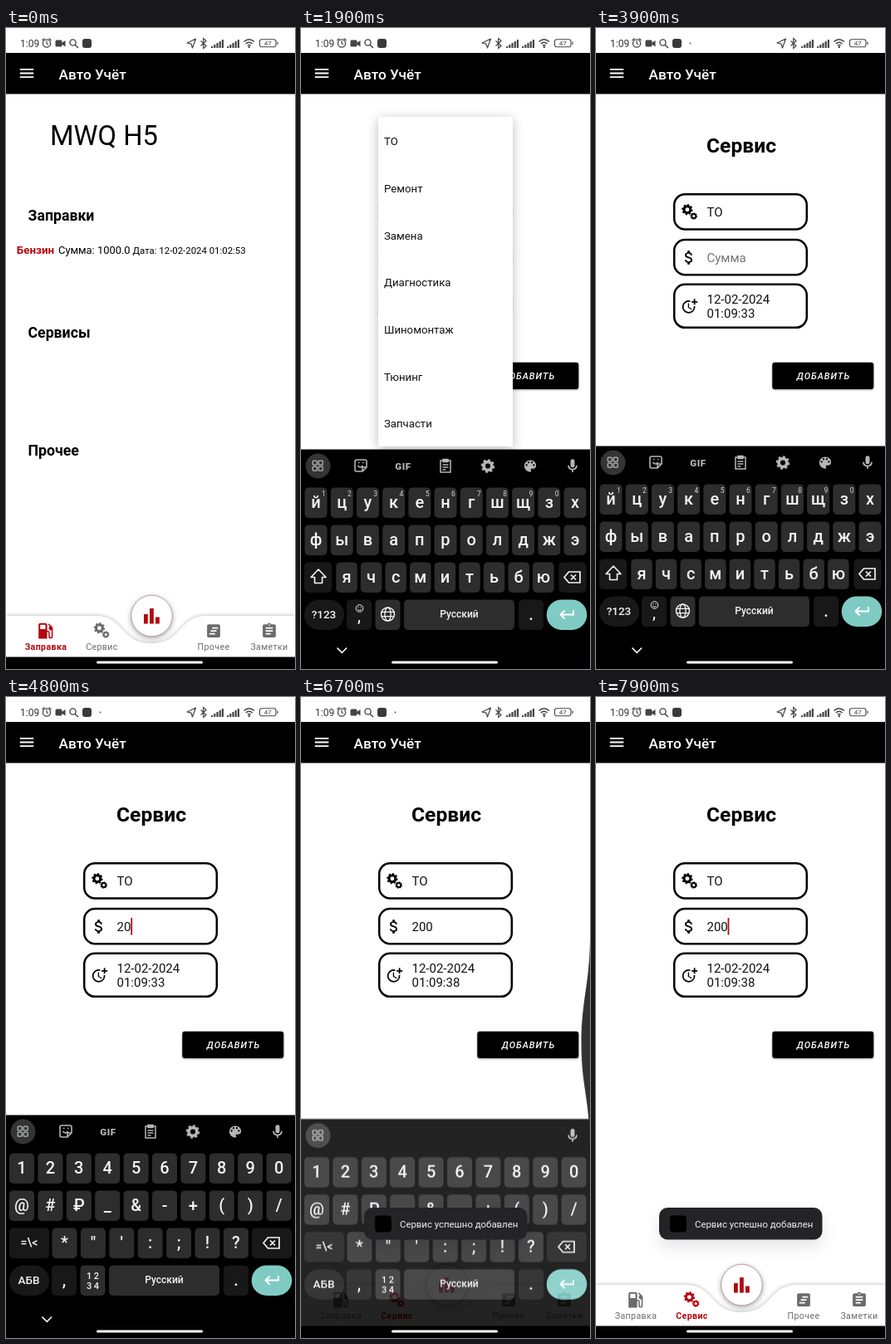
Animation of 348 by 772 pixels, one loop 8 s. Source, as an HTML page:

```html
<!DOCTYPE html>
<html lang="ru">
<head>
<meta charset="utf-8">
<title>Авто Учёт</title>
<style>
html, body { margin: 0; width: 100%; height: 100%; overflow: hidden; background: #fff; }
svg { display: block; width: 348px; height: 772px; font-family: Roboto, "Noto Sans", sans-serif; }
text { white-space: pre; }
.mid { text-anchor: middle; }
.line { fill: none; stroke: currentColor; }
.home, .form, .menu, .kb, .toast, .edge, .gas, .service { animation: 8s linear infinite; }
.home { animation-name: home; }
.form { animation-name: form; }
.menu { animation-name: menu; filter: drop-shadow(0 3px 7px rgba(0,0,0,.26)); }
.kb { animation-name: kb; }
.toast { animation-name: toast; filter: drop-shadow(0 9px 9px rgba(0,0,0,.1)); }
.edge { animation-name: edge; transform-origin: 348px 0; }
.tab { color: #6b6b6b; font-size: 10.6px; letter-spacing: .4px; }
.gas { animation-name: gas; animation-timing-function: step-end; }
.service { animation-name: service; animation-timing-function: step-end; }
.bar { filter: drop-shadow(0 -1px 2px rgba(0,0,0,.22)); }
.fab { filter: drop-shadow(0 2px 3px rgba(0,0,0,.35)); }
.add { filter: drop-shadow(0 1px 1px rgba(0,0,0,.4)); }
@keyframes home { 0%, 8.125% { opacity: 1 } 12.5%, 100% { opacity: 0 } }
@keyframes form { 0%, 8.125% { opacity: 0 } 12.5%, 100% { opacity: 1 } }
@keyframes menu { 0%, 20% { opacity: 0 } 22.5%, 31.25% { opacity: 1 } 33.75%, 100% { opacity: 0 } }
@keyframes toast { 0%, 77.5% { opacity: 0 } 81.25%, 100% { opacity: 1 } }
@keyframes edge { 0%, 80% { transform: scaleX(0) } 83.75% { transform: scaleX(1) } 87.5%, 100% { transform: scaleX(0) } }
@keyframes gas { 0% { color: #b4060f; font-weight: 700 } 8.75%, 100% { color: #6b6b6b; font-weight: 400 } }
@keyframes service { 0% { color: #6b6b6b; font-weight: 400 } 8.75%, 100% { color: #b4060f; font-weight: 700 } }
@keyframes kb {
  0%, 20% { transform: translateY(268px); opacity: 1 }
  21.25% { transform: translateY(140px) }
  22.5% { transform: translateY(40px) }
  23.75% { transform: translateY(4px) }
  25%, 82.5% { transform: none; opacity: 1 }
  83.75% { transform: translateY(4px); opacity: .87 }
  85% { transform: translateY(70px); opacity: .4 }
  86.25% { transform: translateY(180px); opacity: .08 }
  87.5%, 100% { transform: translateY(268px); opacity: 0 }
}
</style>
</head>
<body>
<svg id="stage" viewBox="0 0 348 772"></svg>
<script>
const LOOP = 8000;
const RED = '#b4060f';

// 24-unit icons
const icons = {
  menu: 'M3 18h18v-2H3zM3 13h18v-2H3zM3 6v2h18V6z',
  gas: 'M19.8 7.2l-3.7-3.7L15 4.6l2.1 2.1A2.5 2.5 0 0 0 19 11.3v7.2a1 1 0 0 1-2 0V14a2 2 0 0 0-2-2h-1V5a2 2 0 0 0-2-2H6a2 2 0 0 0-2 2v16h10v-7.5h1.5v5a2.5 2.5 0 0 0 5 0V9q0-1-.7-1.8zM12 10H6V5h6z',
  board: 'M19 3h-4.2a3 3 0 0 0-5.6 0H5a2 2 0 0 0-2 2v14a2 2 0 0 0 2 2h14a2 2 0 0 0 2-2V5a2 2 0 0 0-2-2zM12 3a1 1 0 1 1 0 2a1 1 0 1 1 0-2zM14 17H7v-2h7zM17 13H7v-2h10zM17 9H7V7h10z',
  note: 'M5 3h14a2 2 0 0 1 2 2v14a2 2 0 0 1-2 2H5a2 2 0 0 1-2-2V5a2 2 0 0 1 2-2zM10 7v2h8V7zM8 11v2h8v-2zM6 15v2h8v-2z',
  clock: 'M10 8v6l4.7 2.9.8-1.2-4-2.4V8zM17.9 12A7 7 0 1 1 13 6.3V4.2A9 9 0 1 0 19.9 12zM20 5V2h-2v3h-3v2h3v3h2V7h3V5z',
  money: 'M11.8 10.9c-2.27-.59-3-1.2-3-2.15 0-1.09 1.01-1.85 2.7-1.85 1.78 0 2.44.85 2.5 2.1h2.21c-.07-1.72-1.12-3.3-3.21-3.81V3h-3v2.16c-1.94.42-3.5 1.68-3.5 3.61 0 2.31 1.91 3.46 4.7 4.13 2.5.6 3 1.48 3 2.41 0 .69-.49 1.79-2.7 1.79-2.06 0-2.87-.92-2.98-2.1h-2.2c.12 2.19 1.76 3.42 3.68 3.83V21h3v-2.15c1.95-.37 3.5-1.5 3.5-3.55 0-2.84-2.43-3.81-4.7-4.4z',
  mic: 'M12 14a3 3 0 0 0 3-3V5a3 3 0 0 0-6 0v6a3 3 0 0 0 3 3zM17 11a5 5 0 0 1-10 0H5a7 7 0 0 0 6 6.9V21h2v-3.1A7 7 0 0 0 19 11z',
  palette: 'M12 3a9 9 0 0 0 0 18a1.5 1.5 0 0 0 1.1-2.5a1.5 1.5 0 0 1 1.1-2.5H16a5 5 0 0 0 5-5c0-4.4-4-8-9-8z' +
    [[6.5, 10.5], [9.5, 6.5], [14.5, 6.5], [17.5, 10.5]].map(([x, y]) => `M${x} ${y - 1.5}a1.5 1.5 0 1 1 0 3a1.5 1.5 0 1 1 0-3z`).join('')
};

const icon = (name, x, y, size) =>
  `<path fill="currentColor" fill-rule="evenodd" d="${icons[name]}" transform="translate(${x - size / 2} ${y - size / 2}) scale(${size / 24})"/>`;
const text = (s, x, y, size, more = '') => `<text x="${x}" y="${y}" font-size="${size}" ${more}>${s}</text>`;
const mid = (s, x, y, size, more = '') => text(s, x, y, size, 'class="mid" ' + more);
const rect = (x, y, w, h, r, fill, more = '') =>
  `<rect x="${x}" y="${y}" width="${w}" height="${h}" rx="${r}" fill="${fill}" ${more}/>`;
const line = (d, w, more = '') => `<path class="line" d="${d}" stroke-width="${w}" ${more}/>`;
const show = (spans, body) => `<g data-show="${spans}">${body}</g>`;
const tint = (color, body) => `<g color="${color}">${body}</g>`;

const gear = (x, y, r, teeth = 8) =>
  `<circle class="line" cx="${x}" cy="${y}" r="${r * .6}" stroke-width="${r * .45}"/>
   <circle class="line" cx="${x}" cy="${y}" r="${r * .86}" stroke-width="${r * .3}" pathLength="${teeth * 2}" stroke-dasharray="1"/>`;
const cogs = (x, y) => gear(x - 2.6, y - 2.8, 6.6) + gear(x + 5.2, y + 5, 4.3);
const cursor = (x, y, spans) => show(spans, rect(x, y, 1.8, 20.5, 0, '#a3101b'));

function statusBar() {
  const bars = x => [0, 1, 2, 3, 4].map(i => rect(x + i * 3.2, 22 - i * 2, 2.2, 2 + i * 2, .5, '#444')).join('');
  return rect(0, 0, 348, 30, 0, '#fff') + text('1:09', 17, 23, 12, 'fill="#333"') + tint('#444',
    `<circle class="line" cx="49" cy="18.5" r="4.6" stroke-width="1.3"/>` +
    line('M49 15.5v3.2l2 1M43.5 15l3-2.5M54.5 15l-3-2.5', 1.2) +
    rect(59.5, 14.5, 8, 8, 1.5, '#444') + `<path d="M67 18l4.5-3v7.5l-4.5-3z" fill="#444"/>` +
    `<circle class="line" cx="80.5" cy="17.5" r="3.6" stroke-width="1.4"/>` + line('M83 20.2l4 3.8', 1.5) +
    rect(92, 13, 11, 11, 3, '#3a3a3a') +
    line('M228.5 13l-10.5 5 5 1.2 1.5 4.8z', 1.2, 'stroke-linejoin="round"') +
    line('M234.5 15.5l6.5 6-3.3 3v-12l3.3 3-6.5 6', 1.2) + bars(247) + bars(266) +
    line('M286.5 16.5q6-5.5 12.5 0M288.8 19q3.9-3.5 7.9 0M291 21.2q1.8-1.5 3.6 0', 1.5) +
    `<circle cx="292.8" cy="23" r="1.2" fill="#444"/>` +
    line('M308 13.7h14.5a2.5 2.5 0 0 1 2.5 2.5v4.1a2.5 2.5 0 0 1-2.5 2.5h-14.5a2.5 2.5 0 0 1-2.5-2.5v-4.1a2.5 2.5 0 0 1 2.5-2.5zM327 16.5v3.5', 1.1) +
    mid(47, 315.3, 21.2, 8, 'fill="#444"')) +
    show('2100-6900', '<circle cx="113.5" cy="18.5" r=".9" fill="#555"/>');
}

function header() {
  return rect(0, 30, 348, 49.5, 0, '#000') + tint('#fff', icon('menu', 25, 54.5, 22)) +
    text('Авто Учёт', 63.5, 61.5, 17.2, 'fill="#fff" font-weight="500"');
}

function home() {
  const heads = ['Заправки', 'Сервисы', 'Прочее'];
  return `<g class="home">` + text('MWQ H5', 53, 140.5, 32.7) +
    heads.map((s, i) => text(s, 26.5, 231.5 + i * 141.5, 17.7, 'font-weight="700"')).join('') +
    text('Бензин', 12.8, 271.5, 13.4, `font-weight="700" fill="${RED}"`) +
    text('Сумма: 1000.0', 63, 271.5, 12.9) + text('Дата: 12-02-2024 01:02:53', 152.5, 271.5, 11.4) + '</g>';
}

function form() {
  const box = (y, h) => rect(94.2, y, 159.6, h, 13, '#fff', 'stroke="#000" stroke-width="2.5"');
  const value = (s, y, fill = '#111') => text(s, 133.5, y, 15, `fill="${fill}"`);
  const hint = (s, y) => value(s, y, '#757575');
  return `<g class="form">` + mid('Сервис', 175, 149.8, 24.6, 'font-weight="700"') +
    box(200.2, 42.2) + box(255, 42.2) + box(308.8, 52) +
    cogs(112.5, 221.5) + icon('money', 112, 276.5, 22) + icon('clock', 112.5, 335, 21) +
    show('0-2500', hint('Вид сервиса', 227.2)) + show('2500-8000', value('ТО', 227.2)) +
    show('0-4500', hint('Сумма', 282)) + show('4500-4700', value('2', 282)) +
    show('4700-5000', value('20', 282)) + show('5000-8000', value('200', 282)) +
    value('12-02-2024', 332) + show('0-5900', value('01:09:33', 349.3)) + show('5900-8000', value('01:09:38', 349.3)) +
    cursor(133.5, 211, '1300-1800 2300-2500') + cursor(153, 211, '2500-3000') +
    cursor(133.5, 266, '3100-3600 4100-4500') + cursor(142, 266, '4500-4700') + cursor(150.3, 266, '4700-5000') +
    cursor(158.6, 266, '5000-5500 6000-6500 7000-7500 7900-8000') +
    rect(212.3, 402.7, 122, 32.4, 3, '#000', 'class="add"') +
    mid('ДОБАВИТЬ', 274, 423, 11, 'fill="#fff" font-weight="500" font-style="italic" letter-spacing="1"') + '</g>';
}

function bottomNav() {
  const tab = (name, x, pic, cls = '') => `<g class="tab ${cls}">${pic}${mid(name, x, 748.5, 'inherit', 'fill="currentColor"')}</g>`;
  return `<path class="bar" fill="#fff" d="M0 708H108C143 708 137 741 175 741S207 708 242 708H348V757H0z"/>` +
    tab('Заправка', 48, icon('gas', 47.5, 726, 25), 'gas') + tab('Сервис', 115.5, cogs(115, 725.5), 'service') +
    tab('Прочее', 250, icon('note', 250, 726, 21)) + tab('Заметки', 317, icon('board', 317, 726, 21)) +
    `<circle class="fab" cx="175.5" cy="708" r="24.8" fill="#fff" stroke="#a87878" stroke-width=".7"/>` +
    rect(166, 706, 4.8, 11.5, 0, RED) + rect(173, 699, 4.8, 18.5, 0, RED) + rect(180, 709.5, 4.8, 8, 0, RED) +
    rect(0, 757.5, 348, 15, 0, '#000');
}

function menu() {
  const items = ['ТО', 'Ремонт', 'Замена', 'Диагностика', 'Шиномонтаж', 'Тюнинг', 'Запчасти'];
  return `<g class="menu">` + rect(93, 107, 162, 397, 1, '#fff') +
    items.map((s, i) => text(s, 100, 141.3 + i * 56.65, 13.2, 'fill="#111"')).join('') + '</g>';
}

const KEY = '#2d2d2e', FN = '#181819', INK = '#f4f4f4', DIM = '#b4b6b8';
const KEY_H = 36.5;
const keyTop = row => 549.4 + row * 45;
const cap = (x, row, w, fill = KEY, r = 5) => rect(x - w / 2, keyTop(row), w, KEY_H, r, fill);
const ink = (s, x, y, size) => mid(s, x, y, size, `fill="${INK}" font-weight="500"`);

const key = (x, row, w, label, fill = KEY, size = 20) =>
  cap(x, row, w, fill) + ink(label, x, keyTop(row) + 17.8 + size * .35, size);
const keys = (chars, row, x, step, w) => [...chars].map((c, i) => key(x + i * step, row, w, c)).join('');
const modeKey = label => cap(28, 3, 48, FN, 18) + ink(label, 27.5, 707, 13.5);
const backspace = (x, w) => cap(x, 2, w, FN) + tint(INK,
  line(`M${x - 10} 657.5l5.5-6.5h13.5v13h-13.5zM${x - 2} 654.5l6 6m0-6l-6 6`, 1.7));

function letters() {
  const nums = [...'1234567890'].map((n, i) => mid(n, 27.3 + i * 31.2, 559.5, 8.5, 'fill="#d6d6d6"')).join('');
  return keys('йцукенгшщзх', 0, 18, 31.2, 27) + nums + keys('фывапролджэ', 1, 18, 31.2, 27) +
    cap(20.5, 2, 33, FN) + tint(INK, line('M21 648l-9 9.5h4.5v7h9v-7h4.5z', 1.6, 'stroke-linejoin="round"')) +
    keys('ячсмитьбю', 2, 55, 29.6, 25.5) + backspace(327, 33) + modeKey('?123') +
    cap(70, 3, 30, FN) + ink(',', 70, 711, 18) +
    tint(INK, `<circle class="line" cx="70.5" cy="695" r="4.3"/>` + line('M68.2 696q2.3 3 4.6 0', 1) + line('M68.5 693.5h1m2 0h1', 1.2)) +
    cap(104.5, 3, 30) + tint(INK, `<circle class="line" cx="104.5" cy="702" r="8" stroke-width="1.4"/>
      <ellipse class="line" cx="104.5" cy="702" rx="3.6" ry="8" stroke-width="1.3"/>` + line('M97 699.3h15M97 704.7h15', 1.3));
}

function symbols() {
  return keys('1234567890', 0, 19, 34.4, 30) + show('4700-4780 4900-5000', key(328.6, 0, 30, '0', '#505052')) +
    keys('@#₽_&-+()/', 1, 19, 34.4, 30).replace('>&<', '>&amp;<') +
    key(28, 2, 48, '=\\&lt;', FN, 14) + keys('*"\':;!?', 2, 70.5, 34.4, 30) + backspace(320, 48) +
    modeKey('АБВ') + key(70, 3, 30, ',', FN) +
    cap(104.5, 3, 30) + ink('1 2', 104.5, 701, 11) + ink('3 4', 104.5, 713, 11);
}

function tools() {
  return tint(DIM,
    line('M67 516h10a2 2 0 0 1 2 2v7l-5 5h-7a2 2 0 0 1-2-2v-10a2 2 0 0 1 2-2zM79 525h-5v5M68.5 523q3 4 6 0M69 519.5h1.5M74 519.5h1.5', 1.6) +
    mid('GIF', 123, 527.7, 11.5, `fill="${DIM}" font-weight="900" letter-spacing=".6"`) +
    line('M168 517h12v14h-12zM171 515.5h6v3h-6zM170.5 522h7M170.5 525h7M170.5 528h4', 1.5) +
    gear(225, 523.5, 8.2) + icon('palette', 276, 523.5, 19));
}

function suggestions() {
  return ['ТО', 'ТОЛЬКО', 'ТОГДА'].map((s, i) => mid(s, 82 + i * 91, 529, 15.8, 'fill="#dedede"')).join('') +
    rect(124.5, 512, 1, 23, 0, '#2b2b2b') + rect(221, 512, 1, 23, 0, '#2b2b2b');
}

function keyboard() {
  const grid = [0, 1, 2, 3].map(i => rect(14.2 + i % 2 * 7, 517.2 + (i >> 1) * 7, 5, 5, 1, 'none', `stroke="${DIM}" stroke-width="1.3"`)).join('');
  return `<g class="kb">` + rect(0, 503.5, 348, 300, 0, '#000') +
    `<circle cx="20.5" cy="523.5" r="15" fill="#343435"/>` + grid + tint(DIM, icon('mic', 327, 523.5, 20)) +
    show('0-2600 3100-6600', tools()) + show('2600-3100', suggestions()) +
    show('0-4000', letters()) + show('4000-8000', symbols()) +
    key(190.5, 3, 133, 'Русский', KEY, 12) + key(277, 3, 30, '.', FN) + cap(320, 3, 48.6, '#7fcbc4', 18.2) +
    tint('#fff', line('M328 697v5.5h-15M317.5 697.5l-5 5 5 5', 1.8)) + '</g>' +
    show('1700-6600', tint('#fff', line('M43.5 746.5l5.8 5.8 5.8-5.8', 1.6)));
}

function toast() {
  return `<g class="toast">` + rect(76, 615, 196.5, 38.5, 10, '#242426') + rect(89, 624.5, 20, 20, 4, '#000') +
    text('Сервис успешно добавлен', 119, 638.5, 11.4, 'fill="#f2f2f2"') + '</g>';
}

const edge = `<path class="edge" fill="#333" d="M348 292C347 350 337.5 365 337.5 417S347 480 348 542z"/>`;

stage.innerHTML = rect(0, 0, 348, 772, 0, '#fff') + statusBar() + header() + home() + form() + bottomNav() +
  menu() + keyboard() + toast() + edge + rect(109, 762.5, 128, 3, 1.5, '#fff');

// data-show lists the spans, in ms, during which a part is visible
for (const el of document.querySelectorAll('[data-show]')) {
  const marks = new Map([[0, 0]]);
  for (const span of el.dataset.show.split(' ')) {
    const [from, to] = span.split('-').map(Number);
    marks.set(from, 1);
    if (to < LOOP) marks.set(to, 0);
  }
  const frames = [...marks].map(([t, opacity]) => ({ offset: t / LOOP, opacity, easing: 'step-end' }));
  frames.push({ offset: 1, opacity: frames.at(-1).opacity });
  el.animate(frames, { duration: LOOP, iterations: Infinity });
}
</script>
</body>
</html>
```
